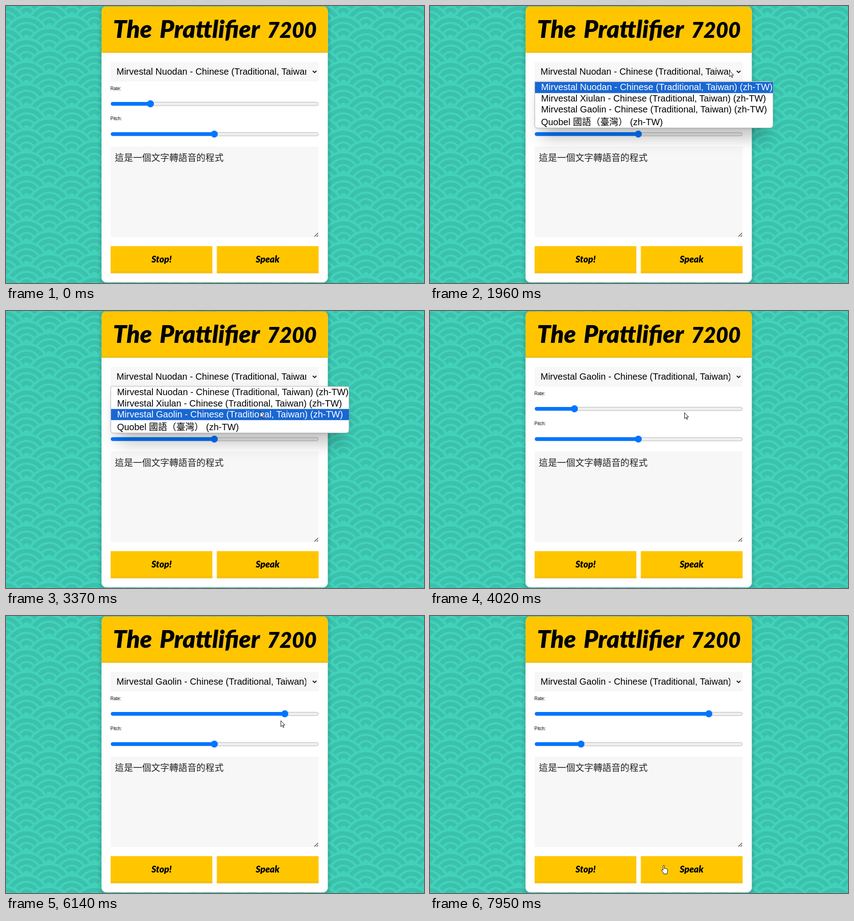
An HTML page with a canvas that plays this animation: 919 by 609 pixels, repeating every 8000 ms.

```html
<!DOCTYPE html>
<html lang="en">
<head>
<meta charset="utf-8">
<title>Text to speech</title>
<style>
  html, body { margin: 0; width: 100%; height: 100%; overflow: hidden; background: #3bc1ac; }
  canvas, svg { position: absolute; left: 0; top: 0; display: block; }
  text { font: 20px "Liberation Sans", "Noto Sans CJK TC", "Noto Sans CJK", sans-serif; white-space: pre; }
  .script { font: italic 900 20px Lato, sans-serif; text-anchor: middle; }
  .title { font-size: 53.5px; word-spacing: 6px; filter: drop-shadow(3px 3px 0 #f3c010); }
  .title tspan { font-size: 47px; }
  .small { font-size: 10px; }
  .note { font: 300 19.9px "Noto Sans CJK TC", "Noto Sans CJK", sans-serif; fill: #222; }
  .glow { filter: blur(18px); opacity: .24; }
  .list { fill: #fff; stroke: #b0b0b0; stroke-width: .8; filter: drop-shadow(0 1px 2px rgba(0, 0, 0, .15)); }
  .cursor { fill: #fff; stroke: #000; stroke-width: 1; stroke-linejoin: round; }
</style>
</head>
<body>
<canvas id="scene" width="919" height="609"></canvas>
<canvas id="sliders" width="919" height="609"></canvas>
<svg lang="zh-TW" width="919" height="609" viewBox="0 0 919 609">
  <clipPath id="clip"><rect x="230" y="123" width="430" height="43"/></clipPath>
  <text class="script title" x="459" y="70">The Prattlifier <tspan>7200</tspan></text>
  <g clip-path="url(#clip)"><text id="label" x="243" y="151"></text></g>
  <text class="small" x="229.5" y="184.5">Rate:</text>
  <text class="small" x="229.5" y="251">Pitch:</text>
  <text class="note" x="239.600" y="340.500">這是一個文字轉語音的程式</text>
  <rect id="caret" x="478" y="322" width="1" height="24"/>
  <text class="script" x="342" y="564">Stop!</text>
  <text class="script" x="575" y="564">Speak</text>
  <g id="popup">
    <rect class="glow" x="246" y="190" width="492" height="100"/>
    <path class="list" d="M230.5 166H750a4 4 0 0 1 4 4V262a6 6 0 0 1-6 6H236.500a6 6 0 0 1-6-6Z"/>
    <rect id="mark" x="231" width="523" height="24.500" fill="#1967d2"/>
  </g>
  <circle id="halo" r="11.500" fill="#ff0" fill-opacity=".6"/>
  <path id="arrow" class="cursor" d="M.5 .5V13.500L3.500 10.700L5.600 15.300L7.500 14.500L5.500 10H9.500Z"/>
  <path id="beam" fill="none" stroke="#000" d="M-3-8H-1L0-7L1-8H3M0-7V7M-3 8H-1L0 7L1 8H3"/>
  <path id="hand" class="cursor"
    d="M-1.500 10V.7a1.500 1.500 0 0 1 3 0V6.500a1.400 1.400 0 0 1 2.500 .4 1.400 1.400 0 0 1 2.400 .6 1.300 1.300 0 0 1 2 1V12c0 2-1 3-1.300 6H0C-.5 15.500-3.500 12.500-4.700 10.200-5.200 9-3.500 8-2.500 9Z"/>
</svg>
<script>
const LOOP = 8000;
const $ = id => document.getElementById(id);
const TAIL = ' - Chinese (Traditional, Taiwan) (zh-TW)';
const VOICES = ['Nuodan', 'Xiulan', 'Gaolin'].map(n => 'Mirvestal ' + n + TAIL)
  .concat('Quobel 國語（臺灣） (zh-TW)');
const BASELINES = [185, 210, 234, 262];

// Pointer moves: start, end, picture count, target x, target y, ease-out power for drags
const START = [876, 63];
const MOVES = [
  [440, 1040, 10, 658, 142],
  [1960, 2510, 9, 556, 208],
  [3170, 3430, 5, 559, 223],
  [4020, 4690, 10, 326, 221],
  [4890, 5480, 10, 630, 221, 1.53],
  [5950, 6540, 9, 462, 277],
  [6690, 7070, 7, 325, 285, 1.63],
  [7480, 7950, 8, 514, 549]
];
const RATE_DRAG = MOVES[4], PITCH_DRAG = MOVES[6];

const within = (t, a, b) => t >= a && t < b;
const mix = (a, b, p) => a + (b - a) * p;

// Eased progress of a move, advancing in even steps
function progress(t, [from, to, count, , , power]) {
  if (t >= to) return 1;
  if (t < from) return 0;
  const steps = count - 1;
  const p = Math.floor((t + 5 - from) / (to - from) * steps) / steps;
  return power ? 1 - (1 - p) ** power : p * p * (3 - 2 * p);
}

function pointerAt(t) {
  let [x, y] = START;
  for (const m of MOVES) {
    if (t < m[0]) break;
    const p = progress(t, m);
    x = mix(x, m[3], p);
    y = mix(y, m[4], p);
  }
  return { x, y };
}

function disc(c, x, y, r, color) {
  c.fillStyle = color;
  c.beginPath();
  c.arc(x, y, r, 0, Math.PI * 2);
  c.fill();
}

function box(c, x, y, w, h, color) {
  c.fillStyle = color;
  c.fillRect(x, y, w, h);
}

function line(c, points, width, color) {
  c.strokeStyle = color;
  c.lineWidth = width;
  c.beginPath();
  points.forEach(([x, y]) => c.lineTo(x, y));
  c.stroke();
}

function drawWaves(c) {
  const dark = '#3bc1ac', light = '#42d2bb', tile = 99.5, left = -4.5, top = -29.7;
  const radii = [50.2, 44.5, 35.4, 30.4, 21.2, 16.3, 7.1];
  for (let row = 0; row < 30; row++) {
    const shift = left + (row % 2 ? 0 : tile / 2);
    for (let x = shift - tile; x < 1020; x += tile) {
      radii.forEach((r, i) =>
        disc(c, x, top + row * tile / 4, r * tile / 100, i % 2 ? dark : light));
    }
  }
}

function drawScene() {
  const c = $('scene').getContext('2d');
  drawWaves(c);

  // Soft edge around the card: only the shadow of an off-stage shape shows
  c.save();
  c.shadowColor = 'rgba(0,0,0,.1)';
  c.shadowBlur = 5;
  c.shadowOffsetX = 2000;
  c.beginPath();
  c.roundRect(205 - 2000, -4, 507.5, 616.5, 15);
  c.fill();
  c.restore();

  c.save();
  c.beginPath();
  c.roundRect(210, 1, 497.5, 606.5, 10);
  c.clip();
  box(c, 210, 1, 498, 607, '#fff');
  box(c, 210, 1, 498, 102, '#ffc600');
  box(c, 210, 98, 498, 5, '#f3c010');
  c.restore();

  box(c, 230, 123, 457.5, 43, '#f7f7f7');
  line(c, [[674.5, 142.5], [678.5, 146.5], [682.5, 142.5]], 1.8, '#000');

  box(c, 230, 309, 457.5, 199, '#f7f7f7');
  line(c, [[678, 507], [686, 499]], 1.2, '#4a3a20');
  line(c, [[683, 507], [686, 504]], 1.2, '#4a3a20');

  for (const x of [230, 463.5]) {
    box(c, x, 528, 223.7, 59.5, '#ffc600');
    box(c, x, 582.5, 223.7, 5, '#f3c010');
  }
}

// Slider looks: idle, hovered, pressed
const LOOKS = [
  { fill: '#0075ff', thumb: '#0075ff', track: '#efefef', edge: '#b2b2b2' },
  { fill: '#005cc8', thumb: '#005cc8', track: '#e5e5e5', edge: '#a6a6a6' },
  { fill: '#3793ff', thumb: '#005cc8', track: '#f5f5f5', edge: '#cbcbcb' }
];

function drawSlider(c, x, y, look) {
  c.beginPath();
  c.roundRect(231, y - 3.5, 455.5, 7.5, 3.8);
  c.fillStyle = look.track;
  c.fill();
  c.strokeStyle = look.edge;
  c.lineWidth = 1;
  c.stroke();
  c.beginPath();
  c.roundRect(230.5, y - 4, x - 230.5, 8, 4);
  c.fillStyle = look.fill;
  c.fill();
  disc(c, x, y, 7.7, look.thumb);
}

function show(id, visible) {
  $(id).style.display = visible ? '' : 'none';
}

function place(id, x, y) {
  $(id).setAttribute('transform', `translate(${x.toFixed(2)} ${y.toFixed(2)})`);
}

const options = VOICES.map((name, i) => {
  const el = document.createElementNS('http://www.w3.org/2000/svg', 'text');
  el.setAttribute('x', 244.2);
  el.setAttribute('y', BASELINES[i]);
  el.textContent = name;
  $('popup').append(el);
  return el;
});

const sliders = $('sliders').getContext('2d');

function render(t) {
  const { x, y } = pointerAt(t);
  const open = within(t, 1580, 4020);
  const rateDown = within(t, 4890, 5480);
  const pitchDown = within(t, 6690, 7210);

  const look = (cy, down) => {
    const over = !open && t >= 440 && x > 230 && x < 688 && Math.abs(y - cy) < 8;
    return LOOKS[down ? 2 : over ? 1 : 0];
  };
  sliders.clearRect(0, 0, 919, 609);
  drawSlider(sliders, mix(317.5, 613, progress(t, RATE_DRAG)), 215, look(215, rateDown));
  drawSlider(sliders, mix(458, 332, progress(t, PITCH_DRAG)), 281.6, look(281.6, pitchDown));

  $('label').textContent = VOICES[t < 4020 ? 0 : 2];
  show('caret', within(t, 1370, 1580));

  show('popup', open);
  if (open) {
    const row = Math.max(0, Math.floor((y - 167) / 24.4));
    $('mark').setAttribute('y', 167 + row * 24.2);
    options.forEach((el, i) => el.setAttribute('fill', i === row ? '#fff' : '#000'));
  }

  show('halo', within(t, 1580, 1640) || within(t, 3960, 4020) || rateDown || pitchDown);
  place('halo', x, y);

  const kind = y >= 528 ? 'hand' : y >= 309 && y < 508 ? 'beam' : 'arrow';
  for (const id of ['arrow', 'beam', 'hand']) {
    show(id, t >= 440 && id === kind);
    place(id, x, y);
  }
}

drawScene();
const begin = performance.now();
function tick() {
  render((performance.now() - begin) % LOOP);
  requestAnimationFrame(tick);
}
tick();
</script>
</body>
</html>
```
